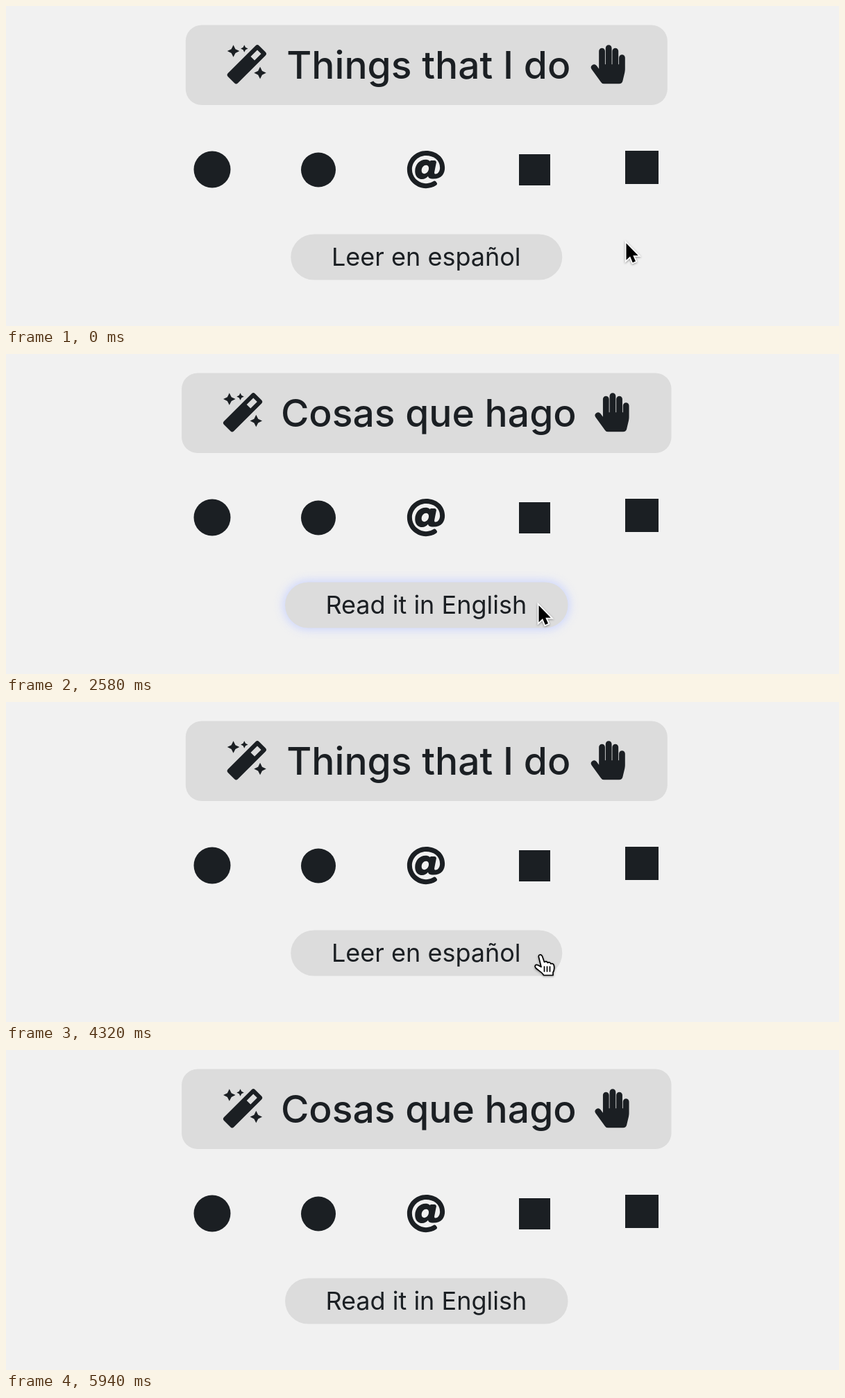
Animation, 1200 px wide and 462 px high, one loop 6.54 s. Source, as an HTML page:

```html
<!DOCTYPE html>
<html lang="en">
<head>
<meta charset="utf-8">
<title>Language switch</title>
<style>
  html, body { margin: 0; width: 100%; height: 100%; overflow: hidden; background: #f1f1f1; }
  svg { display: block; width: 100%; height: 100%; }
  text {
    font-family: Inter, "Open Sans", sans-serif;
    font-optical-sizing: none;
    font-variation-settings: "opsz" 14;
    text-anchor: middle;
  }
  .ink, text { fill: #1b1f23; }
  .panel { fill: #dcdcdc; }
  .title { font-size: 55.2px; font-weight: 500; }
  .label { font-size: 36px; font-weight: 400; }
  .glow { fill: #c8d2ff; stroke: #c8d2ff; stroke-width: 5px; filter: blur(7px); }
  .cursor { filter: drop-shadow(0 1.5px 1.5px rgba(0, 0, 0, .4)); }
</style>
</head>
<body>
<svg viewBox="0 0 1200 462">
  <defs>
    <path id="palm" d="M448 168a40 40 0 0 0-80 0v88h-8V80a40 40 0 0 0-80 0v176h-8V40a40 40 0 0 0-80 0v216h-8V80a40 40 0 0 0-80 0v236l-32-43.5a40 40 0 0 0-64.7 47l125.6 172.7A48 48 0 0 0 172 512h198a48 48 0 0 0 46.7-37l26.5-112.7A192 192 0 0 0 448 318z"/>
    <g id="wand">
      <path fill-rule="evenodd" d="M503 94L418 9a32 32 0 0 0-45 0L9 373a32 32 0 0 0 0 45l85 85a32 32 0 0 0 45 0L503 139a32 32 0 0 0 0-45zM359 203l-51-51 87-86 51 51z"/>
      <path id="stars"/>
    </g>
  </defs>

  <g id="views"></g>

  <g class="ink">
    <circle cx="297" cy="236" r="26.5"/>
    <circle cx="450" cy="236.5" r="25"/>
    <path transform="translate(577 208) scale(.1094)" d="M256 8C119 8 8 119 8 256c0 137 111 248 248 248 48 0 95-14 135-40 12-8 15-24 6-35l-10-13c-8-9-21-12-32-5C326 430 291 440 256 440c-101 0-184-83-184-184S155 72 256 72c100 0 184 58 184 160 0 39-21 80-58 84-17-1-17-13-14-30l24-121C395 150 383 136 368 136h-45a13 13 0 0 0-13 12c-15-18-41-22-60-22-75 0-138 62-138 152 0 65 37 106 96 106 27 0 57-16 75-39 10 34 41 34 71 34C463 379 504 308 504 232 504 96 394 8 256 8zm-22 304c-22 0-36-15-36-40 0-45 31-73 59-73 22 0 36 15 36 41 0 45-34 72-59 72z"/>
    <rect x="739" y="214" width="45" height="45"/>
    <rect x="892" y="209" width="48" height="48"/>
  </g>

  <g id="arrow" class="cursor">
    <path transform="scale(.93)" d="M0 0V26L6 20.5L10 30L14.5 28L10.5 19H18.5Z" fill="#000" stroke="#fff" stroke-width="4" paint-order="stroke"/>
  </g>
  <g id="pointer" class="cursor" stroke="#000" stroke-width="1.7" stroke-linejoin="round" stroke-linecap="round">
    <path fill="#fff" d="M7.5 6C6.5 2.2 11 1 12.5 4.5L15.5 13C17 11.5 19.5 12 20.3 14C22 12.6 24.3 13.4 24.8 15.5C26.8 14.6 29 15.8 29.4 18C30.2 22 29.8 25 28 28V32H14.5C13 28 8 26 3.5 22C.5 18.5 3 15.5 6.5 17.5L11 20Z"/>
    <path fill="none" d="M15.5 19.5v7M19.5 19.5v7M23.5 19.5v7"/>
  </g>
</svg>

<script>
const LOOP = 6540, STEP = 60, MID = 605.8;
const $ = id => document.getElementById(id);

const star = (x, y, r) => {
  const a = r / 3, b = r - a;
  return `M${x} ${y - r}l${a} ${b} ${b} ${a} ${-b} ${a} ${-a} ${b} ${-a} ${-b} ${-b} ${-a} ${b} ${-a}z`;
};
$('stars').setAttribute('d', star(224, 48, 48) + star(80, 80, 80) + star(432, 368, 80));

const icon = (id, x) => `<use href="#${id}" class="ink" transform="translate(${x} 56.3) scale(.1094)"/>`;
const pill = (cls, w) =>
  `<rect class="${cls}" x="${MID - w / 2}" y="329.5" width="${w}" height="66" rx="33"/>`;

function view({ title, label, boxW, pillW }) {
  const left = MID - boxW / 2;
  return `<g>
    <rect class="panel" x="${left}" y="27.5" width="${boxW}" height="115.5" rx="23"/>
    ${icon('wand', left + 60)}${icon('palm', left + boxW - 110)}
    <text class="title" x="${MID + 3}" y="105">${title}</text>
    ${pill('glow', pillW)}${pill('panel', pillW)}
    <text class="label" x="${MID - .5}" y="375">${label}</text>
  </g>`;
}

$('views').innerHTML =
  view({ title: 'Things that I do', label: 'Leer en español', boxW: 694, pillW: 391 }) +
  view({ title: 'Cosas que hago', label: 'Read it in English', boxW: 705.5, pillW: 407.5 });
const views = [...$('views').children];
const glows = views.map(v => v.querySelector('.glow'));

// Press, language swap and release times
const clicks = [
  { down: 2460, swap: 2580, up: 2640 },
  { down: 3540, swap: 3660, up: 3720 },
  { down: 5280, swap: 5340, up: 5400 }
];

const easeOut = p => 1 - (1 - p) ** 2;
const glide = (t, start, end, from, to) => {
  const p = easeOut(Math.min(1, Math.max(0, (t - start) / (end - start))));
  return from.map((v, i) => v + (to[i] - v) * p);
};

function cursorAt(t) {
  if (t < 240) {
    const k = t / 60;
    return { arrow: true, pos: [893.5 + 42 * k + 10 * k * k, 342.5 + 2 * k + 2.4 * k * k] };
  }
  if (t < 1800 || t >= 5760) return null;
  if (t < 2880) {
    const pos = glide(t, 1740, 2220, [732, 462], [756.5, 362]);
    return { arrow: pos[1] > 386, pos };
  }
  if (t < 3540) return { pos: glide(t, 2820, 2940, [756.5, 362], [758.5, 363.2]) };
  if (t < 4860) return { pos: glide(t, 4500, 4740, [760, 362.5], [778.5, 369]) };
  return { pos: glide(t, 4860, 5040, [778.5, 369], [765, 368]) };
}

function show(el, pos) {
  el.style.display = pos ? '' : 'none';
  if (pos) el.setAttribute('transform', `translate(${pos[0]} ${pos[1]})`);
}

function draw(time) {
  const t = Math.floor((time % LOOP) / STEP) * STEP;
  const lang = clicks.filter(c => t >= c.swap).length % 2;
  const click = clicks.find(c => t >= c.down && t < c.up);
  const swapped = click && t >= click.swap;

  views.forEach((v, i) => v.style.display = i === lang ? '' : 'none');
  const strength = !click ? 0 : swapped ? .9 : Math.min(1, .5 + (t - click.down) / 120);
  glows[lang].style.opacity = strength;

  const cur = cursorAt(t);
  const arrow = cur && (cur.arrow || swapped);
  const tip = cur && swapped ? [cur.pos[0] + 11, cur.pos[1] + 1] : cur && cur.pos;
  show($('arrow'), arrow ? tip : null);
  show($('pointer'), cur && !arrow ? tip : null);
}

const origin = performance.now();
function tick() {
  draw(performance.now() - origin);
  requestAnimationFrame(tick);
}
tick();
</script>
</body>
</html>
```
